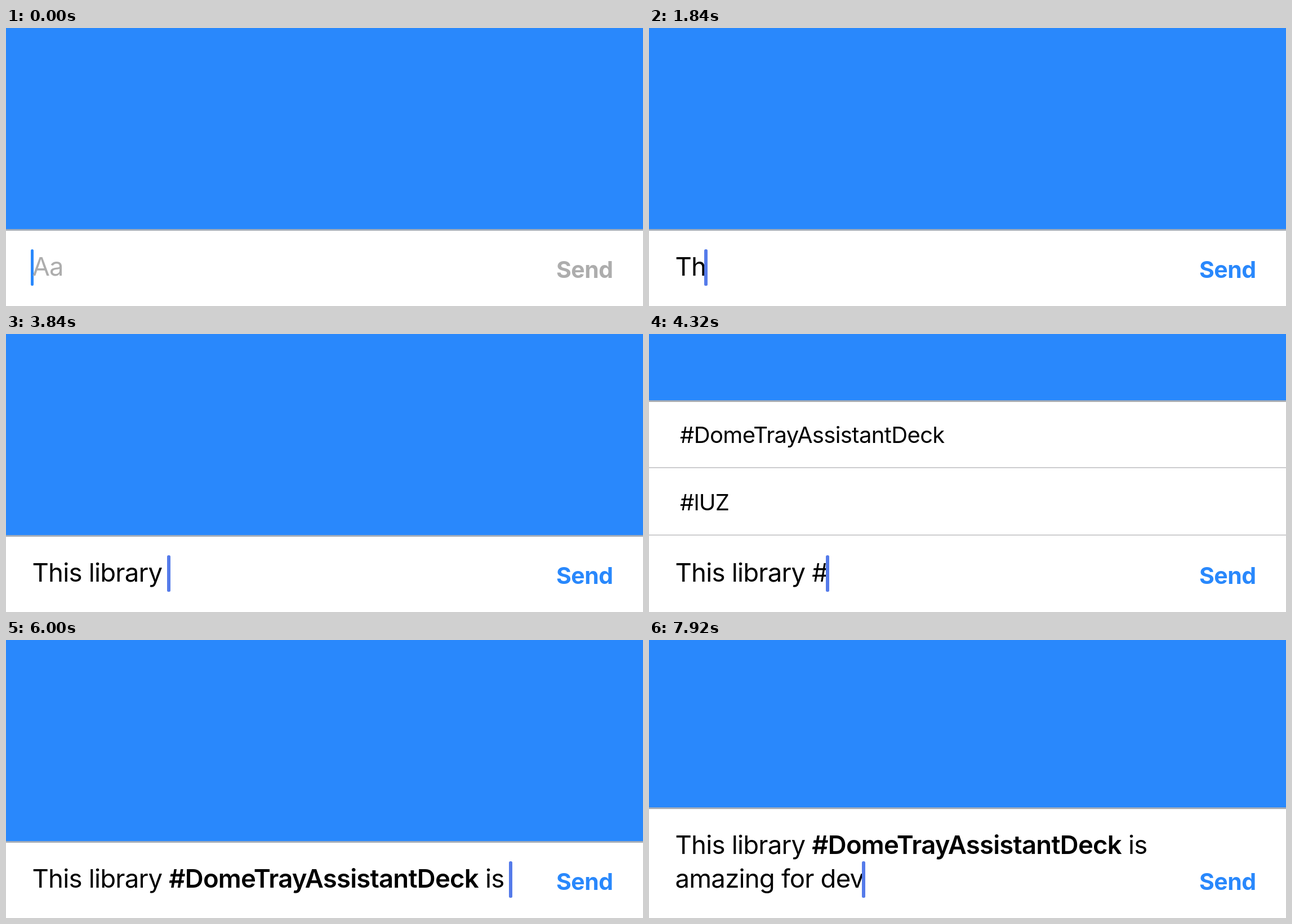
An HTML page for the animation above (8 s loop, 1131x495 px).

```html
<!DOCTYPE html>
<html lang="en">
<head>
<meta charset="utf-8">
<title>Message bar with tag completion</title>
<style>
  html, body { margin: 0; width: 100%; height: 100%; overflow: hidden; }
  #stage {
    position: relative; width: 1131px; height: 495px; overflow: hidden;
    background: #2988fc; color: #000;
    font-family: Inter, "Liberation Sans", sans-serif;
  }
  #stage div { position: absolute; white-space: pre; }
  #bar {
    left: 0; right: 0; bottom: 0; height: 134px;
    background: #fff; border-top: 3px solid #a5adb8;
  }
  #bar.tall { height: 194px; }
  #tags {
    left: 0; top: 118px; width: 1131px; height: 240px;
    background: #fff; border-top: 3px solid #a9adb3;
  }
  #tags div {
    left: 0; width: 1076px; height: 116px; padding-left: 55px;
    border-bottom: 2px solid #cdcdcf;
    font-size: 40px; line-height: 117px; letter-spacing: -0.016em;
  }
  .line {
    left: 46.5px; font-size: 45.5px; line-height: 60px;
    letter-spacing: -0.017em;
  }
  .line b { font-weight: 600; }
  #upper { top: 335px; }
  #lower { top: 395px; }
  #hint { top: 395px; color: #adadad; }
  #caret {
    position: absolute; top: -1.5px; width: 5.5px; height: 65.5px;
    margin-left: -3px; border-radius: 2.5px;
  }
  #send {
    right: 53.5px; top: 400px; line-height: 60px;
    font-size: 41px; font-weight: 700; letter-spacing: -0.013em;
  }
</style>
</head>
<body>
<div id="stage">
  <div id="bar"></div>
  <div id="tags"><div style="top:0">#DomeTrayAssistantDeck</div><div style="top:120px">#lUZ</div></div>
  <div id="upper" class="line"><span></span><b></b><span></span></div>
  <div id="lower" class="line"><span></span><b></b><span></span></div>
  <div id="hint" class="line">Aa</div>
  <div id="send">Send</div>
</div>
<script>
const LOOP = 8000, TICK = 80;
const TAG = '#DomeTrayAssistantDeck';
const BLUE = '#2988fc', INDIGO = '#557bea', GREY = '#adadad';
const MENU = [4320, 4880];

// [time, characters added]; TAG replaces the typed '#'
const keys = [
  [1760, 'T'], [1840, 'h'], [2000, 'i'], [2080, 's'],
  [2240, ' '], [2400, 'l'], [2560, 'i'], [2640, 'b'], [2800, 'ra'], [3040, 'r'],
  [3520, 'y'], [3840, ' '], [4320, '#'], [4880, TAG], [4880, ' '],
  [5680, 'i'], [5840, 's'], [6000, ' '],
  [6160, 'a'], [6320, 'm'], [6400, 'a'], [6480, 'z'], [6560, 'i'],
  [6720, 'n'], [6880, 'g'], [7040, ' '], [7280, 'f'], [7440, 'o'],
  [7600, 'r'], [7680, ' '], [7840, 'de'], [7920, 'v']
];
const WRAP = 6160;

// [time, caret opacity]
const blink = [
  [0, 1], [80, 1], [320, 0], [480, 0], [720, 1],
  [1040, 1], [1280, 0], [1440, 0], [1680, 1],
  [4800, 1], [4880, 0.6], [4960, 1], [5360, 1], [5600, 0], [5680, 1], [LOOP, 1]
];

const $ = id => document.getElementById(id);
const caret = document.createElement('i');
caret.id = 'caret';

function textAt(t, from, to) {
  return keys.filter(([at]) => at <= t && at >= from && at < to)
    .reduce((s, [, add]) => add === TAG ? s.slice(0, -1) + add : s + add, '');
}

function opacityAt(t) {
  const i = blink.findIndex(([at]) => at > t);
  const [t0, a] = blink[i - 1], [t1, b] = blink[i];
  return a + (b - a) * (t - t0) / (t1 - t0);
}

function fill(line, text) {
  const at = text.indexOf(TAG);
  const [before, bold, after] = line.children;
  before.textContent = at < 0 ? text : text.slice(0, at);
  bold.textContent = at < 0 ? '' : TAG;
  after.textContent = at < 0 ? '' : text.slice(at + TAG.length);
}

function draw(t) {
  const first = textAt(t, 0, WRAP);
  const second = textAt(t, WRAP, LOOP);
  const tall = second !== '';
  fill($('upper'), tall ? first : '');
  fill($('lower'), tall ? second : first);
  $('bar').classList.toggle('tall', tall);
  $('hint').hidden = first !== '';
  $('tags').hidden = t < MENU[0] || t >= MENU[1];
  $('send').style.color = first ? BLUE : GREY;
  caret.style.background = t < 1040 ? BLUE : INDIGO;
  caret.style.opacity = opacityAt(t);
}

function frame() {
  const t = performance.now() % LOOP;
  draw(Math.floor(t / TICK) * TICK);
  requestAnimationFrame(frame);
}

$('lower').append(caret);
frame();
</script>
</body>
</html>
```
